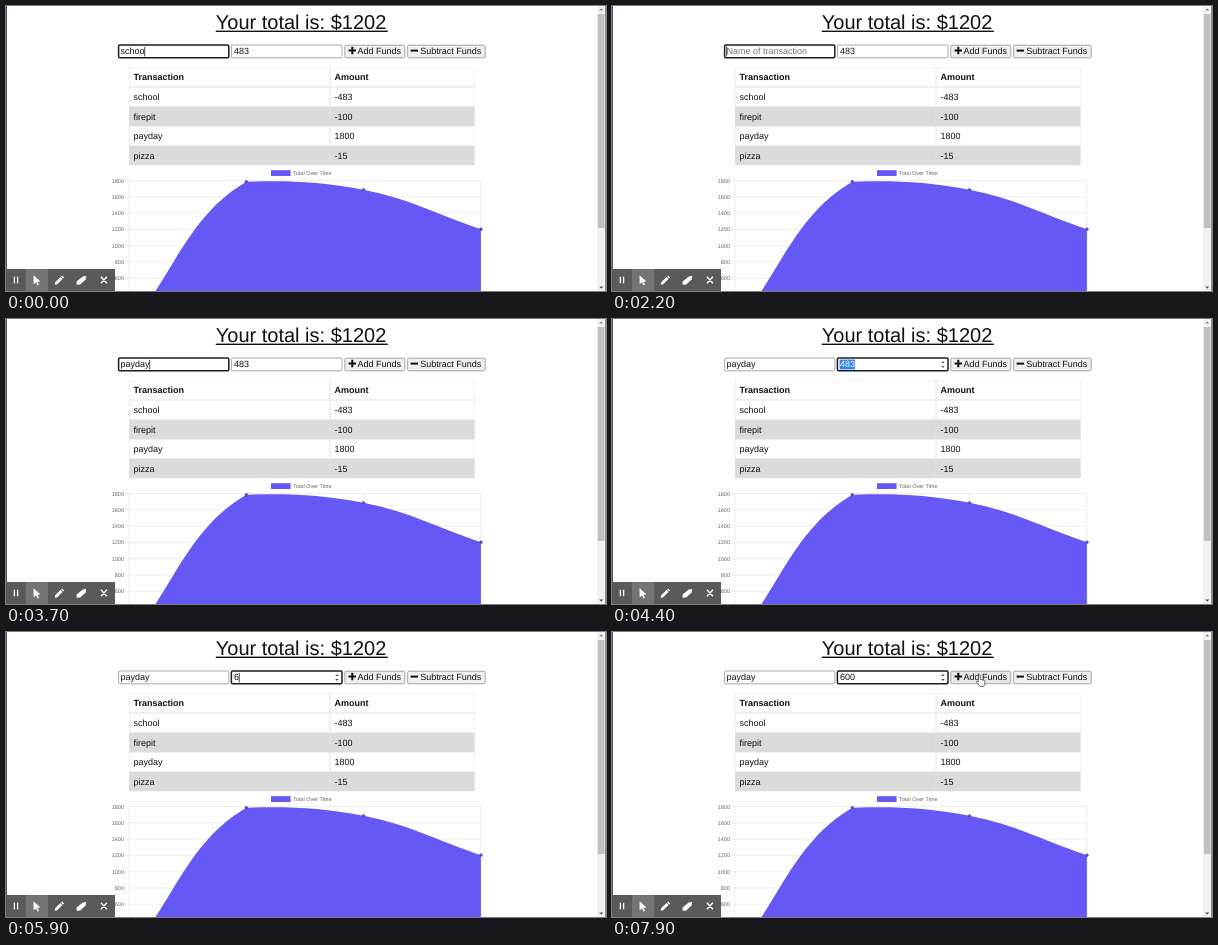
An HTML page that plays this animation: 600 by 285 pixels, repeating every 8 s.

```html
<!DOCTYPE html>
<html lang="en">
<head>
<meta charset="utf-8">
<title>Budget tracker</title>
<style>
  html, body { margin: 0; width: 100%; height: 100%; overflow: hidden; background: #fff; }
  svg { display: block; width: 600px; height: 285px; }
  text { font-family: "Liberation Sans", Arial, sans-serif; font-size: 9px; fill: #111; white-space: pre; text-rendering: geometricPrecision; }
  .title { font-size: 20px; }
  .head { font-weight: bold; }
  .small { font-size: 5.5px; fill: #666; }
  .field { fill: #fff; stroke: #858585; stroke-width: .7; }
  .field.focus { stroke: #1c1c20; stroke-width: 1.5; }
  .button { fill: #efefef; stroke: #858585; stroke-width: .7; }
  .button.hover { fill: #e6e6e6; }
</style>
</head>
<body>
<svg viewBox="0 0 600 285">
  <rect width="600" height="285" fill="#fefefe"/>
  <text class="title" x="209.8" y="22.5">Your total is: $1202</text>
  <rect x="209.8" y="24.6" width="172" height="1.4" fill="#111"/>

  <rect id="nameBox" class="field" x="112.6" y="39" width="110.2" height="12.8" rx="1.2"/>
  <rect id="sumBox" class="field" x="225.4" y="39" width="110.6" height="12.8" rx="1.2"/>
  <rect id="selection" x="227.6" y="40.6" width="15.4" height="9.8" fill="#2f86ee"/>
  <text id="name" x="114.5" y="48.4"></text>
  <text id="sum" x="228" y="48.4"></text>
  <rect id="caret" y="40.8" width=".8" height="9.6" fill="#222"/>
  <path id="spinner" d="M329.3 44l1.7-2 1.7 2zM329.3 47l1.7 2 1.7-2z" fill="#555"/>

  <rect id="add" class="button" x="338.8" y="39.2" width="60" height="12.6" rx="1.5"/>
  <path d="M342.6 44.5H350M346.3 40.8V48.2" stroke="#111" stroke-width="2"/>
  <text x="351.6" y="48.4">Add Funds</text>
  <rect class="button" x="401.6" y="39.2" width="77.6" height="12.6" rx="1.5"/>
  <path d="M404.6 44.6H412" stroke="#111" stroke-width="2"/>
  <text x="414.2" y="48.4">Subtract Funds</text>

  <g id="table"></g>

  <rect x="265" y="164.2" width="19.6" height="5.8" fill="#6558f5"/>
  <text class="small" x="287" y="169">Total Over Time</text>
  <g id="chart"></g>

  <rect x="591" width="8.4" height="285" fill="#f1f1f1"/>
  <rect x="591.8" y="8" width="6.8" height="214" fill="#c1c1c1"/>
  <path d="M593.2 4.6l2-2.4 2 2.4z" fill="#8a8a8a"/>
  <path d="M593.2 280.4l2 2.4 2-2.4z" fill="#505050"/>
  <path d="M.4 0V285" stroke="#111" stroke-width=".8"/>
  <path d="M599.7 0V285" stroke="#222" stroke-width=".6"/>

  <g id="toolbar">
    <rect y="263" width="109" height="22" fill="#5a5a5a"/>
    <rect x="20" y="263" width="22" height="22" fill="#747474"/>
    <path d="M8.4 270.8v6.4M11.6 270.8v6.4M94.9 270.8l6 6.4M100.9 270.8l-6 6.4" stroke="#fff" stroke-width="1.3"/>
    <path d="M27.5 269.3l7 6.1-3.1.3 1.6 3.1-1.4.7-1.5-3.2-2.4 2z" fill="#fff"/>
    <path d="M48.7 278.8l.5-2.6 5.3-5.2 2 2-5.3 5.3zM55.1 270.4l1-1 2 2-1 1z" fill="#fff"/>
    <path d="M70.6 275.5l6.2-5.1 3.4-.4-.6 3.4-5.4 5.1-3.6.3z" fill="#fff"/>
  </g>

  <path id="pointer" d="M0 0q1-.9 1.8 0V4l4 .9q.9.3.8 1.3L6 9.7 5.3 11H1.8L-1.8 6.8q-.2-1 .8-.9L0 6.6z" fill="#fff" stroke="#333" stroke-width=".7" stroke-linejoin="round"/>
</svg>
<script>
const NS = "http://www.w3.org/2000/svg";
const $ = id => document.getElementById(id);

function draw(parent, tag, attrs, text) {
  const el = document.createElementNS(NS, tag);
  for (const key in attrs) el.setAttribute(key, attrs[key]);
  if (text !== undefined) el.textContent = text;
  parent.append(el);
  return el;
}

function drawTable() {
  const rows = [["Transaction", "Amount"], ["school", "-483"], ["firepit", "-100"], ["payday", "1800"], ["pizza", "-15"]];
  const cols = [[123.4, 200], [324.2, 144]];
  const g = $("table");
  rows.forEach((row, i) => row.forEach((label, j) => {
    const [x, width] = cols[j], y = 62 + i * 19.55;
    const shaded = i === 2 || i === 4;
    draw(g, "rect", { x, y, width, height: 18.7, fill: shaded ? "#dbdbdb" : "#fff", stroke: shaded ? "#d6d6d6" : "#e6e6e6", "stroke-width": .6 });
    draw(g, "text", { x: x + 4.2, y: y + 12.4, class: i ? "" : "head" }, label);
  }));
}

function drawChart() {
  const g = $("chart"), tension = .4;
  const yOf = value => 174.5 + (1800 - value) / 200 * 16.3;
  const pts = [-15, 1785, 1685, 1202].map((v, i) => [123 + i * 117.3, yOf(v)]);
  const grid = { stroke: "#000", "stroke-opacity": .1, "stroke-width": .6 };
  for (let v = 1800; v >= 600; v -= 200) {
    draw(g, "path", { d: `M118.5 ${yOf(v)}H475`, ...grid });
    draw(g, "text", { x: 118, y: yOf(v) + 2, class: "small", "text-anchor": "end" }, v);
  }
  pts.forEach(([x]) => draw(g, "path", { d: `M${x} 174.5V285`, ...grid }));

  // Control points lean along the neighbours' chord, capped at the plot top.
  const handles = pts.map((p, i) => {
    const a = pts[i - 1] || p, b = pts[i + 1] || p;
    const da = Math.hypot(p[0] - a[0], p[1] - a[1]);
    const db = Math.hypot(b[0] - p[0], b[1] - p[1]);
    const at = k => [p[0] + k * (b[0] - a[0]), Math.max(174.5, p[1] + k * (b[1] - a[1]))];
    return { before: at(-tension * da / (da + db)), after: at(tension * db / (da + db)) };
  });
  let d = `M${pts[0]}`;
  for (let i = 1; i < pts.length; i++) d += `C${handles[i - 1].after} ${handles[i].before} ${pts[i]}`;
  draw(g, "path", { d: d + "V330H123Z", fill: "#6558f5" });
  pts.forEach(([cx, cy]) => draw(g, "circle", { cx, cy, r: 1.7, fill: "#5a4fc4" }));
}

// time, name, amount, focused field, caret shown
const steps = [
  [0, "schoo", "483", "name", 1],
  [400, "scho", "483", "name", 1],
  [500, "sc", "483", "name", 1],
  [600, "", "483", "name", 1],
  [1100, "", "483", "name", 0],
  [2200, "", "483", "name", 1],
  [2700, "p", "483", "name", 1],
  [3000, "pa", "483", "name", 1],
  [3100, "pay", "483", "name", 1],
  [3400, "payd", "483", "name", 1],
  [3500, "payda", "483", "name", 1],
  [3600, "payday", "483", "name", 1],
  [4200, "payday", "483", "name", 0],
  [4300, "payday", "483", "sum", 0],
  [5800, "payday", "6", "sum", 1],
  [6200, "payday", "60", "sum", 1],
  [6300, "payday", "600", "sum", 1],
  [6800, "payday", "600", "sum", 0],
  [7300, "payday", "600", "sum", 1],
  [7800, "payday", "600", "sum", 0]
];
// time, x, y of the fingertip
const path = [
  [6500, 400, 186], [6600, 400, 186], [6900, 374, 110], [7100, 349, 54],
  [7200, 346.4, 44.6], [7400, 350, 44.4], [7700, 364, 43.6], [7900, 366.4, 43.4], [8000, 366.4, 43.4]
];
const LOOP = 8000;
const show = (id, on) => $(id).setAttribute("visibility", on ? "visible" : "hidden");
let last = null;

function showStep(step) {
  if (step === last) return;
  last = step;
  const [, name, sum, focus, caret] = step;
  const selected = focus === "sum" && sum === "483";
  $("name").textContent = name || "Name of transaction";
  $("name").style.fill = name ? "" : "#757575";
  $("sum").textContent = sum;
  $("sum").style.fill = selected ? "#fff" : "";
  $("nameBox").classList.toggle("focus", focus === "name");
  $("sumBox").classList.toggle("focus", focus === "sum");
  show("selection", selected);
  show("spinner", focus === "sum");
  show("caret", caret);
  const field = $(focus), empty = focus === "name" && !name;
  const width = empty ? 0 : field.getComputedTextLength();
  $("caret").setAttribute("x", +field.getAttribute("x") + width - .2);
}

function movePointer(t) {
  const i = path.findIndex(p => p[0] > t);
  const on = i > 0;
  show("pointer", on);
  $("add").classList.toggle("hover", t >= 7100);
  if (!on) return;
  const [t0, x0, y0] = path[i - 1], [t1, x1, y1] = path[i];
  const k = (t - t0) / (t1 - t0);
  $("pointer").setAttribute("transform", `translate(${x0 + (x1 - x0) * k} ${y0 + (y1 - y0) * k})`);
}

function tick() {
  const t = performance.now() % LOOP;
  showStep(steps.findLast(s => s[0] <= t));
  movePointer(Math.floor(t / 100) * 100);
  requestAnimationFrame(tick);
}

drawTable();
drawChart();
tick();
</script>
</body>
</html>
```
